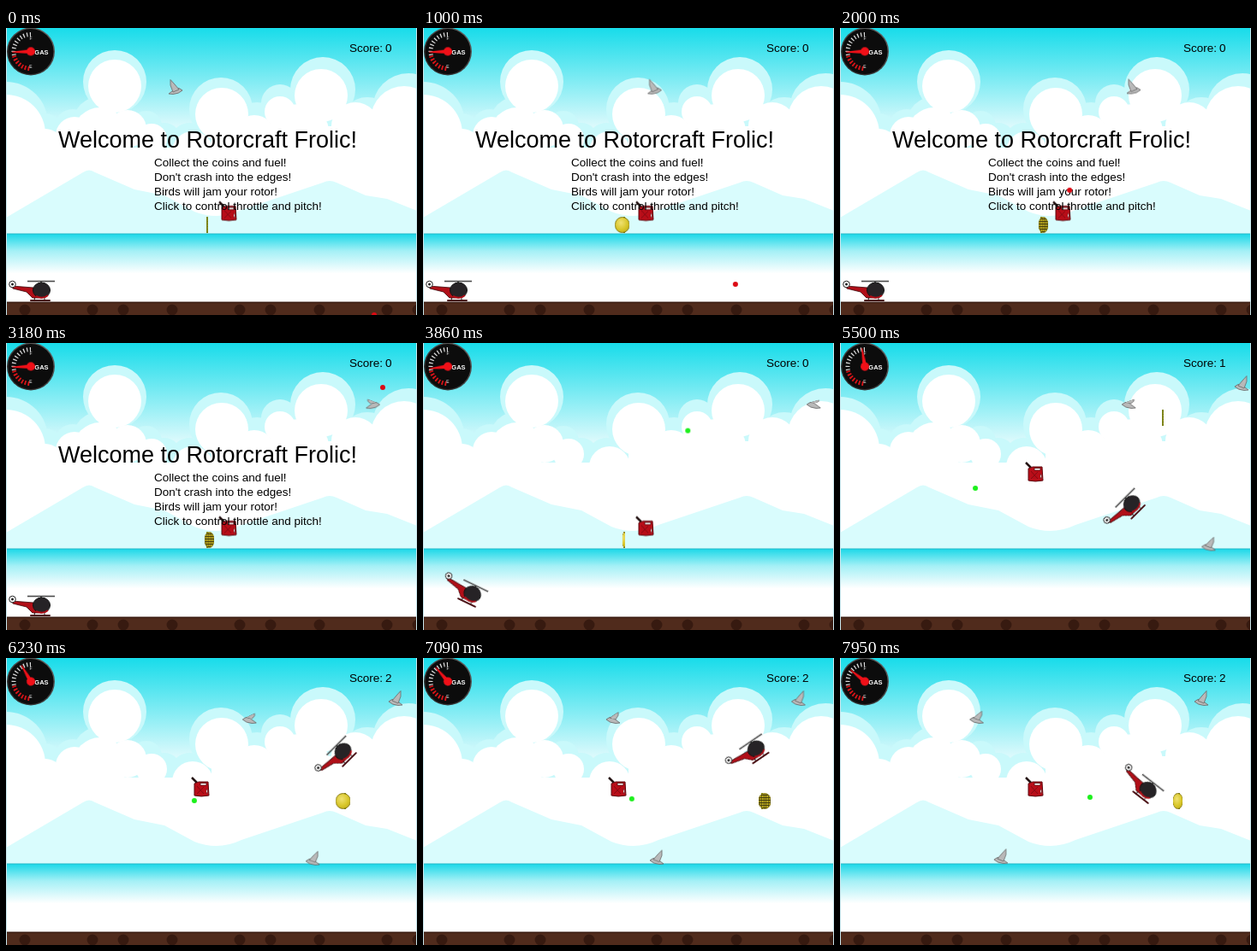
Write an HTML page that moves like this. It is 480 by 336 pixels and loops after 8 s.

```html
<!DOCTYPE html>
<html lang="en">
<head>
<meta charset="utf-8">
<title>Rotorcraft Frolic</title>
<style>
html, body { margin: 0; width: 100%; height: 100%; overflow: hidden; background: #fff; }
svg { position: absolute; left: 0; top: 0; width: 480px; height: 336px; }
text { font: 13.5px "Liberation Sans", Arial, sans-serif; }

/* every timeline shares one 8 s loop */
.loop { animation: 8s linear infinite; }
.intro { animation-name: intro; }
.first { animation-name: first; }
.second { animation-name: second; }
.third { animation-name: third; }
.heli { animation-name: heli; }
.pointer { animation-name: pointer, throttle; }
.needle { animation-name: needle; }
.gull-a { animation-name: gullA; }
.gull-b { animation-name: gullB; --beat: -.4s; }
.gull-c { animation-name: gullC; --beat: -.6s; }
.can { animation-name: can; }
.wing { animation: flap 1s linear var(--beat, 0s) infinite; }

@keyframes intro { 0%, 43.74% { opacity: 1 } 43.75%, to { opacity: 0 } }
@keyframes first { 0%, 61.99% { opacity: 1 } 62%, to { opacity: 0 } }
@keyframes second { 0%, 61.99% { opacity: 0 } 62%, 75.49% { opacity: 1 } 75.5%, to { opacity: 0 } }
@keyframes third { 0%, 75.49% { opacity: 0 } 75.5%, to { opacity: 1 } }

@keyframes heli {
  0%, 43.75% { transform: translate(42px, 307px) rotate(0deg) }
  47.5% { transform: translate(52px, 298px) rotate(22deg) }
  51.9% { transform: translate(87px, 275px) rotate(44deg) }
  56.25% { transform: translate(145px, 248px) rotate(30deg) }
  60% { transform: translate(200px, 232px) rotate(4deg) }
  62.5% { transform: translate(241px, 222px) rotate(-14deg) }
  65% { transform: translate(283px, 211px) rotate(-31deg) }
  68.75% { transform: translate(341px, 188px) rotate(-45deg) }
  73.75% { transform: translate(378px, 136px) rotate(-45deg) }
  77.9% { transform: translate(394px, 109px) rotate(-45deg) }
  82.5% { transform: translate(400px, 98px) rotate(-45deg) }
  87.5% { transform: translate(393px, 102px) rotate(-42deg) }
  93.75% { transform: translate(373px, 124px) rotate(0deg) }
  99.4% { transform: translate(360px, 155px) rotate(38deg) }
  to { transform: translate(359px, 158px) rotate(40deg) }
}
@keyframes pointer {
  0% { transform: translate(430px, 336px) }
  9% { transform: translate(400px, 332px) }
  18% { transform: translate(310px, 250px) }
  25% { transform: translate(268px, 190px) }
  33% { transform: translate(380px, 90px) }
  39.75% { transform: translate(440px, 52px) }
  44% { transform: translate(425px, 60px) }
  51% { transform: translate(235px, 130px) }
  56.25% { transform: translate(158px, 158px) }
  68.75% { transform: translate(158px, 170px) }
  77.9% { transform: translate(220px, 167px) }
  88% { transform: translate(241px, 165px) }
  99.4%, to { transform: translate(292px, 163px) }
}
@keyframes throttle {
  0%, 43.74%, 54%, 57.99% { fill: #dc0a14 }
  43.75%, 53.99%, 58%, to { fill: #1cf01c }
}
@keyframes needle {
  0%, 43.75% { transform: rotate(-2deg) }
  56.25% { transform: rotate(-15deg) }
  63.99% { transform: rotate(-22deg) }
  64% { transform: rotate(90deg) }
  68.75% { transform: rotate(81deg) }
  77.9% { transform: rotate(60deg) }
  99.4%, to { transform: rotate(39deg) }
}
@keyframes gullA {
  0% { transform: translate(198px, 70px) scaleX(-1) }
  46.39% { transform: translate(467px, 69px) scaleX(-1) }
  46.4% { transform: translate(467px, 69px) scaleX(1) }
  to { transform: translate(156px, 69px) scaleX(1) }
}
@keyframes gullB {
  0%, 62.49% { transform: translate(520px, 236px) }
  62.5% { transform: translate(480px, 236px) }
  to { transform: translate(183px, 233px) }
}
@keyframes gullC {
  0%, 62.49% { transform: translate(520px, 48px) }
  62.5% { transform: translate(478.5px, 48px) }
  to { transform: translate(421px, 48px) }
}
@keyframes can {
  0%, 63.99% { transform: translate(260px, 216.5px) }
  64%, to { transform: translate(228px, 153px) }
}
@keyframes flap {
  0%, 19%, to { transform: scaleY(1) }
  24%, 35% { transform: scaleY(.25) }
  55% { transform: scaleY(.7) }
}

/* the coin turns about an axis 3px left of its middle */
.pivot { position: absolute; width: 0; height: 0; }
.pivot::before { content: ""; position: absolute; left: -1px; top: -9.5px; width: 2px; height: 19px; background: #7c851c; }
.coin { position: absolute; left: -6.5px; top: -9.5px; width: 19px; height: 19px;
  transform-origin: 6.5px 50%; transform-style: preserve-3d; animation: spin 8s linear infinite; }
.coin::before, .coin::after { content: ""; position: absolute; inset: 0; box-sizing: border-box;
  border: 1px solid #85770f; border-radius: 50%; backface-visibility: hidden; }
.coin::before { background: radial-gradient(#3d380c 45%, #c0ae20 62%) 0 0 / 3px 3px; }
.coin::after { background: radial-gradient(circle at 40% 35%, #f0e274, #d8c628 55%, #b3a11a); transform: rotateY(180deg); }
@keyframes spin { from { transform: rotateY(var(--start)) } to { transform: rotateY(calc(var(--start) + 4876deg)) } }
</style>
</head>
<body>
<svg viewBox="0 0 480 336">
  <defs>
    <linearGradient id="sky" x2="0" y2="1">
      <stop stop-color="#18dcea"/><stop offset="1" stop-color="#fff"/>
    </linearGradient>
    <linearGradient id="sea" x2="0" y2="1">
      <stop stop-color="#1cd8e8"/><stop offset=".25" stop-color="#a4f0f6"/><stop offset=".58" stop-color="#fff"/>
    </linearGradient>
    <linearGradient id="rim" x1="0" y1="1" x2="1" y2="0">
      <stop stop-color="#222"/><stop offset="1" stop-color="#666"/>
    </linearGradient>
    <pattern id="soil" width="172" height="16" y="320" patternUnits="userSpaceOnUse">
      <path d="M0 0H172V16H0Z" fill="#502b1c"/>
      <path d="M0 0H172V2H0Z" fill="#38190f"/>
      <g fill="#371a10"><circle cx="22" cy="10" r="6.5"/><circle cx="101" cy="10" r="6.5"/><circle cx="137" cy="10" r="6.5"/></g>
    </pattern>
    <g id="gull" fill="#b9b9b9" stroke="#666" stroke-width=".8" stroke-linejoin="round">
      <path d="M-8 3Q-4 -1 0 1L8 7L3 7.500Q-4 7 -8 3Z"/>
      <path class="wing" d="M-4 2L1 -4L6 -9.500L6 -3L3 5Z"/>
    </g>
  </defs>

  <path d="M0 0H480V136H0Z" fill="url(#sky)"/>
  <g fill="#c9f9fb">
    <circle cx="0" cy="112" r="49"/><circle cx="45" cy="125" r="25"/><circle cx="78" cy="117" r="22"/>
    <circle cx="127" cy="63" r="37"/><circle cx="110" cy="112" r="32"/><circle cx="164" cy="115" r="18"/>
    <circle cx="185" cy="130" r="19"/><circle cx="251" cy="95" r="37"/><circle cx="214" cy="133" r="22"/>
    <circle cx="320" cy="88" r="22"/><circle cx="293" cy="112" r="25"/><circle cx="370" cy="72" r="38"/>
    <circle cx="350" cy="112" r="40"/><circle cx="422" cy="113" r="32"/><circle cx="470" cy="95" r="42"/>
    <path d="M0 125H480V200H0Z"/>
  </g>
  <g fill="#fff">
    <circle cx="0" cy="124" r="46"/><circle cx="46" cy="138" r="20"/><circle cx="80" cy="126" r="22"/>
    <circle cx="127" cy="68" r="31"/><circle cx="110" cy="125" r="32"/><circle cx="142" cy="118" r="22"/>
    <circle cx="170" cy="130" r="18"/><circle cx="252" cy="101" r="31"/><circle cx="218" cy="145" r="24"/>
    <circle cx="320" cy="98" r="18"/><circle cx="290" cy="126" r="24"/><circle cx="368" cy="79" r="31"/>
    <circle cx="342" cy="125" r="36"/><circle cx="408" cy="115" r="28"/><circle cx="465" cy="107" r="39"/>
    <path d="M0 140H480V242H0ZM240 115H480V142H240Z"/>
  </g>
  <path d="M0 222L90 169Q97 164 104 169L150 189L185 196L220 215Q248 226 275 213L370 181Q378 177 386 181L420 196L445 200L480 214V242H0Z" fill="#d9fcfd"/>
  <path d="M0 241H480V321H0Z" fill="url(#sea)"/>
  <path d="M0 241H480" stroke="#25b9c9"/>
  <path d="M0 320.500H480V336H0Z" fill="url(#soil)"/>
  <path d="M.5 0V336M479.500 0V336" stroke="#c8e6ec"/>

  <g transform="translate(29 27.500)">
    <circle r="28" fill="url(#rim)"/><circle r="26.500" fill="#0c0c0c"/>
    <g fill="none" stroke-width="5" stroke-dasharray="1.2 2.6">
      <path d="M0 -20A20 20 0 0 0 -19.500 4.500" stroke="#ddd"/>
      <path d="M-19.500 5A20 20 0 0 0 0 20" stroke="#d81418" stroke-dasharray="1.8 2"/>
    </g>
    <g fill="#fff" text-anchor="middle">
      <text x="12.500" y="3" style="font-size:7.5px;font-weight:bold">GAS</text>
      <text y="-14" style="font-size:5px">F</text><text y="19" style="font-size:5px">E</text>
    </g>
    <g class="loop needle" fill="#f01018"><path d="M-22 -.6L0 -2.500V2.500L-22 .6Z"/><circle r="5"/></g>
  </g>

  <g class="loop can">
    <path d="M-11 -13L-5 -7" stroke="#251414" stroke-width="2.500"/>
    <path d="M-8 -6L-3 -8H8L9 8Q0 10 -8 8Z" fill="#b80d18" stroke="#5b0a10"/>
    <path d="M-1 -6.500H6V-4H-1Z" fill="#fff" stroke="#4c0a0e" stroke-width=".8"/>
    <path d="M6 0Q9 3 6 6" fill="#fff" stroke="#4c0a0e" stroke-width=".8"/>
    <path d="M-5 -3L3 6M3 -2L-5 6" stroke="#850a12"/>
  </g>

  <use class="loop gull-a" href="#gull"/>
  <use class="loop gull-b" href="#gull"/>
  <use class="loop gull-c" href="#gull"/>

  <g class="loop heli">
    <path d="M-8 7L-9 12M3 8V12" stroke="#222"/>
    <path d="M-13 12H9" stroke="#4a1216" stroke-width="2" stroke-linecap="round"/>
    <path d="M-35 -5L-10 -3L-4 9L-11 9L-18 2L-34 -2Z" fill="#b00f18" stroke="#3c080b" stroke-width=".8"/>
    <ellipse cx="-.5" rx="10" ry="9" fill="#262326" stroke="#111"/>
    <path d="M-7 7Q1 11 7 6" fill="none" stroke="#b00f18" stroke-width="2"/>
    <path d="M-1 -8V-11" stroke="#222" stroke-width="2"/>
    <path d="M-17 -10.500H15" stroke="#4a4a4a" stroke-width="1.600"/>
    <circle cx="-34.500" cy="-7" r="3.800" fill="#fff" stroke="#222"/><circle cx="-34.500" cy="-7" r="1.500" fill="#222"/>
  </g>

  <g class="loop intro">
    <text x="61" y="140" style="font-size:27px">Welcome to Rotorcraft Frolic!</text>
    <text x="173" y="162">Collect the coins and fuel!</text>
    <text x="173" y="179">Don't crash into the edges!</text>
    <text x="173" y="196">Birds will jam your rotor!</text>
    <text x="173" y="213">Click to control throttle and pitch!</text>
  </g>
  <text x="401" y="28">Score:</text>
  <g transform="translate(443 28)">
    <text class="loop first">0</text><text class="loop second">1</text><text class="loop third">2</text>
  </g>
  <circle class="loop pointer" r="3"/>
</svg>
<div class="pivot loop first" style="left:235px;top:230px;--start:-90deg"><div class="coin"></div></div>
<div class="pivot loop second" style="left:377px;top:87px;--start:158deg"><div class="coin"></div></div>
<div class="pivot loop third" style="left:396px;top:167px;--start:-35deg"><div class="coin"></div></div>
</body>
</html>
```
